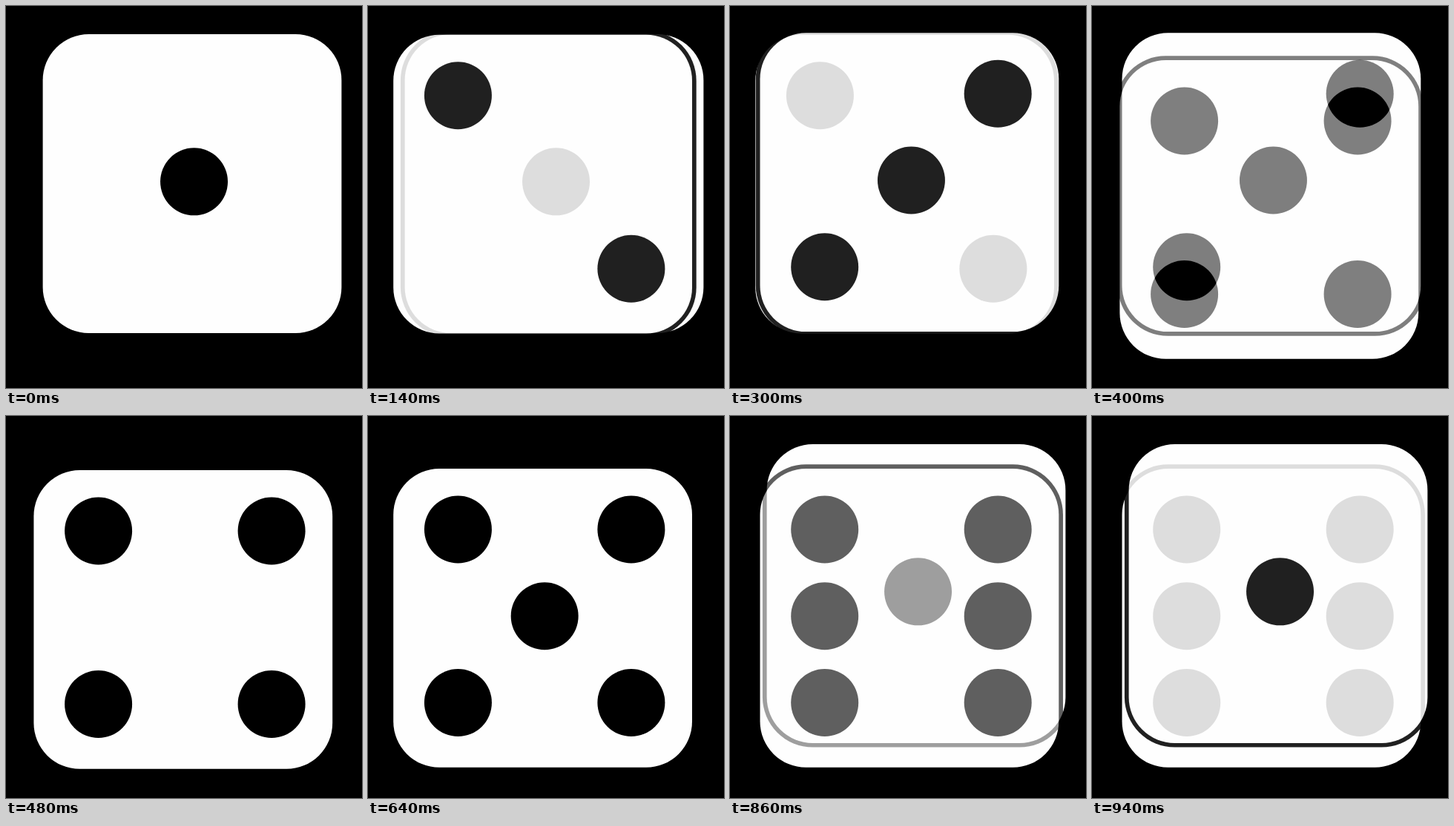
An HTML page with a canvas that plays this animation: 480 px wide and 515 px high, repeating every 960 ms.

```html
<!DOCTYPE html>
<html lang="en">
<head>
<meta charset="utf-8">
<title>Dice</title>
<style>
  html, body { margin: 0; width: 100%; height: 100%; overflow: hidden; background: #000; }
  canvas { display: block; }
</style>
</head>
<body>
<canvas id="stage" width="480" height="515"></canvas>
<script>
const WIDTH = 480, HEIGHT = 515;
const SIZE = 402.8, RADIUS = 62, OUTLINE = 5.7;
const PIP_RADIUS = 45.5, PIP_X = 87.2, PIP_Y = 82, PIP_GAP = 116.75;
const STEP = 20, STEPS_PER_FACE = 8;

// Top-left corner of each die, and its pips as [column, row]
const faces = [
  { x: 49.6, y: 38.1, pips: [[1, 1]] },
  { x: 34.2, y: 38.7, pips: [[0, 0], [2, 2]] },
  { x: 40.5, y: 36.3, pips: [[2, 0], [1, 1], [0, 2]] },
  { x: 37.4, y: 73, pips: [[0, 0], [2, 0], [0, 2], [2, 2]] },
  { x: 34.2, y: 71, pips: [[0, 0], [2, 0], [1, 1], [0, 2], [2, 2]] },
  { x: 40.5, y: 71, pips: [[0, 0], [2, 0], [0, 1], [2, 1], [0, 2], [2, 2]] }
].map(renderFace);

const ctx = document.getElementById("stage").getContext("2d");

function renderFace({ x, y, pips }) {
  const canvas = document.createElement("canvas");
  canvas.width = WIDTH;
  canvas.height = HEIGHT;
  const c = canvas.getContext("2d");
  const box = (grow, color) => {
    c.fillStyle = color;
    c.beginPath();
    c.roundRect(x - grow, y - grow, SIZE + 2 * grow, SIZE + 2 * grow, RADIUS + grow);
    c.fill();
  };
  box(OUTLINE, "#000");
  box(0, "#fefefe");
  c.fillStyle = "#000";
  for (const [col, row] of pips) {
    c.beginPath();
    c.arc(x + PIP_X + col * PIP_GAP, y + PIP_Y + row * PIP_GAP, PIP_RADIUS, 0, 2 * Math.PI);
    c.fill();
  }
  return canvas;
}

function draw(time) {
  const step = Math.floor(time / STEP) % (faces.length * STEPS_PER_FACE);
  const index = Math.floor(step / STEPS_PER_FACE);
  const fade = (step % STEPS_PER_FACE) / STEPS_PER_FACE;
  const current = faces[index];

  ctx.fillStyle = "#000";
  ctx.fillRect(0, 0, WIDTH, HEIGHT);
  ctx.drawImage(current, 0, 0);
  // Blend only where the dice overlap; elsewhere each stays opaque
  if (fade > 0) {
    ctx.drawImage(faces[(index + 1) % faces.length], 0, 0);
    ctx.globalAlpha = 1 - fade;
    ctx.drawImage(current, 0, 0);
    ctx.globalAlpha = 1;
  }
}

let start;
function tick(now) {
  start ??= now;
  draw(now - start);
  requestAnimationFrame(tick);
}
draw(0);
requestAnimationFrame(tick);
</script>
</body>
</html>
```
